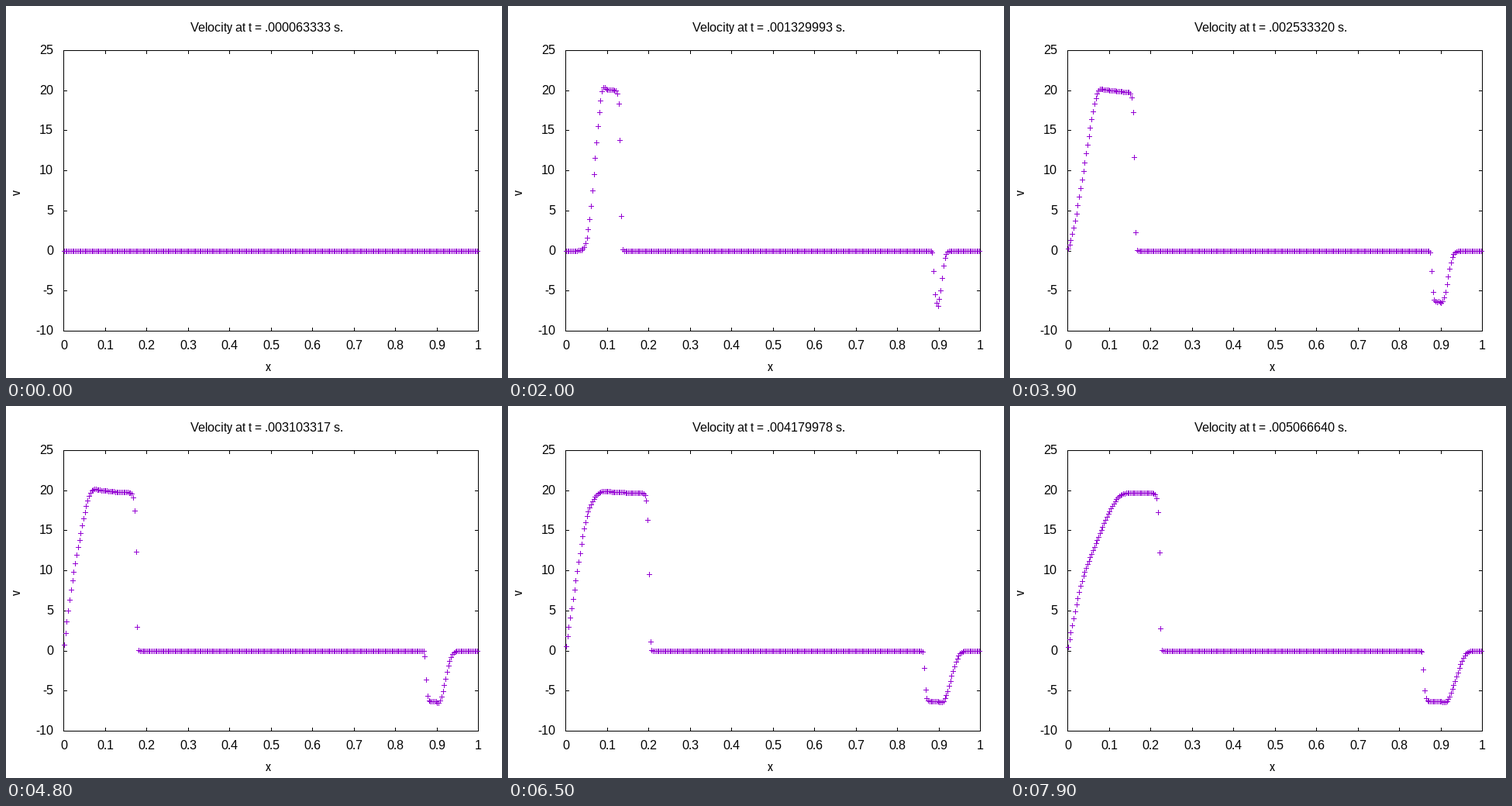
These frames come from a looping animation (640x480 px, 8 s). A matplotlib script:

```python
import numpy as np
import matplotlib.pyplot as plt
from matplotlib.animation import FuncAnimation

plt.rcParams.update({
    "font.family": "Liberation Sans",
    "text.hinting": "native",
    "text.hinting_factor": 1,
    "path.simplify": False,
})

W, H, DPI = 640, 480, 100
PX = 72 / DPI                      # one pixel in points
X0, X1, Y0, Y1 = 74, 609, 57, 419  # plot border
FRAMES, CELLS, SUBSTEPS = 80, 300, 3
GAMMA = 1.4
FRAME_DT = 0.038 / 600
cells = (np.arange(CELLS) + 0.5) / CELLS


# Two blast waves in a closed tube: second-order finite-volume Euler solver.

def conserved(w):
    r, u, p = w
    return np.array([r, r * u, p / (GAMMA - 1) + r * u * u / 2])


def primitive(q):
    r, m, e = q
    p = (GAMMA - 1) * (e - m * m / r / 2)
    return np.array([r, m / r, np.maximum(p, 1e-6)])


def minmod(a, b):
    return np.where(a * b > 0, np.where(abs(a) < abs(b), a, b), 0)


def physical_flux(w, q):
    r, u, p = w
    return np.array([q[1], q[1] * u + p, (q[2] + p) * u])


def star_flux(w, s, mid):
    """Flux between the outer wave of speed s and the contact."""
    r, u, p = w
    q = conserved(w)
    scale = r * (s - u) / (s - mid)
    energy = q[2] / r + (mid - u) * (mid + p / (r * (s - u)))
    return physical_flux(w, q) + s * (scale * np.array([mid * 0 + 1, mid, energy]) - q)


def hllc(a, b):
    ca, cb = (np.sqrt(GAMMA * w[2] / w[0]) for w in (a, b))
    sa = np.minimum(a[1] - ca, b[1] - cb)
    sb = np.maximum(a[1] + ca, b[1] + cb)
    ma, mb = a[0] * (sa - a[1]), b[0] * (sb - b[1])
    mid = (b[2] - a[2] + ma * a[1] - mb * b[1]) / (ma - mb)
    return np.where(sa >= 0, physical_flux(a, conserved(a)),
           np.where(mid >= 0, star_flux(a, sa, mid),
           np.where(sb > 0, star_flux(b, sb, mid),
                    physical_flux(b, conserved(b)))))


def rate(q):
    w = np.pad(primitive(q), ((0, 0), (2, 2)), mode="symmetric")
    w[1, :2] *= -1   # reflecting walls
    w[1, -2:] *= -1
    d = np.diff(w)
    half = minmod(d[:, :-1], d[:, 1:]) / 2
    w = w[:, 1:-1]
    return -np.diff(hllc((w + half)[:, :-1], (w - half)[:, 1:])) * CELLS


def simulate():
    pressure = np.where(cells < 0.1, 1000, np.where(cells > 0.9, 100, 0.01))
    q = conserved((np.ones(CELLS), np.zeros(CELLS), pressure))
    dt = FRAME_DT / SUBSTEPS
    history = []
    for _ in range(FRAMES):
        history.append(q[1] / q[0])
        for _ in range(SUBSTEPS):
            q1 = q + dt * rate(q)
            q = (q + q1 + dt * rate(q1)) / 2
    return history


def px(x):
    return np.floor(X0 + (X1 - X0) * np.asarray(x) + 0.5)


def py(v):
    return np.floor(Y1 - (Y1 - Y0) * (np.asarray(v) + 10) / 35 + 0.5)


def crosses(x, y):
    """Seven-pixel plus signs as one broken line."""
    gap = np.full_like(x, np.nan)
    xs = np.stack([x - 3, x + 4, gap, x + .5, x + .5, gap], 1)
    ys = np.stack([y + .5, y + .5, gap, y - 3, y + 4, gap], 1)
    return xs.ravel(), ys.ravel()


fig = plt.figure(figsize=(W / DPI, H / DPI), dpi=DPI, facecolor="white")
ax = fig.add_axes([0, 0, 1, 1])
ax.set_xlim(0, W)
ax.set_ylim(H, 0)
ax.axis("off")


def stroke(xs, ys, color="black", z=2):
    return ax.plot(xs, ys, color=color, lw=PX, solid_capstyle="butt",
                   solid_joinstyle="miter", snap=False, zorder=z)[0]


def label(x, y, s, **kw):
    return ax.text(x, y, s, fontsize=16 * PX, color="black", **kw)


stroke([X0 + .5, X1 + .5, X1 + .5, X0 + .5, X0 + .5, X1 + .5],
       [Y0 + .5, Y0 + .5, Y1 + .5, Y1 + .5, Y0 + .5, Y0 + .5])
for i in range(11):
    x = px(i / 10)
    stroke([x + .5] * 2, [Y0, Y0 + 5])
    stroke([x + .5] * 2, [Y1 - 4, Y1 + 1])
    label(x + .5, 443, f"{i / 10:g}", ha="center", va="baseline")
for v in range(-10, 26, 5):
    y = py(v)
    stroke([X0, X0 + 5], [y + .5] * 2)
    stroke([X1 - 4, X1 + 1], [y + .5] * 2)
    label(61, y + 5, str(v), ha="right", va="baseline")

label(338.5, 471, "x", ha="center", va="baseline")
label(14, 240, "v", ha="center", va="center", rotation=90)
title = label(238, 33, "", ha="left", va="baseline")
points = stroke([], [], "#9400d3", 3)
cell_px = px(cells)
velocity = simulate()


def draw(k):
    title.set_text(f"Velocity at t = .{(k + 1) * 63333:09d} s.")
    points.set_data(*crosses(cell_px, py(velocity[k])))
    return title, points


anim = FuncAnimation(fig, draw, frames=FRAMES, interval=100,
                     repeat=True, repeat_delay=0)
plt.show()
```
